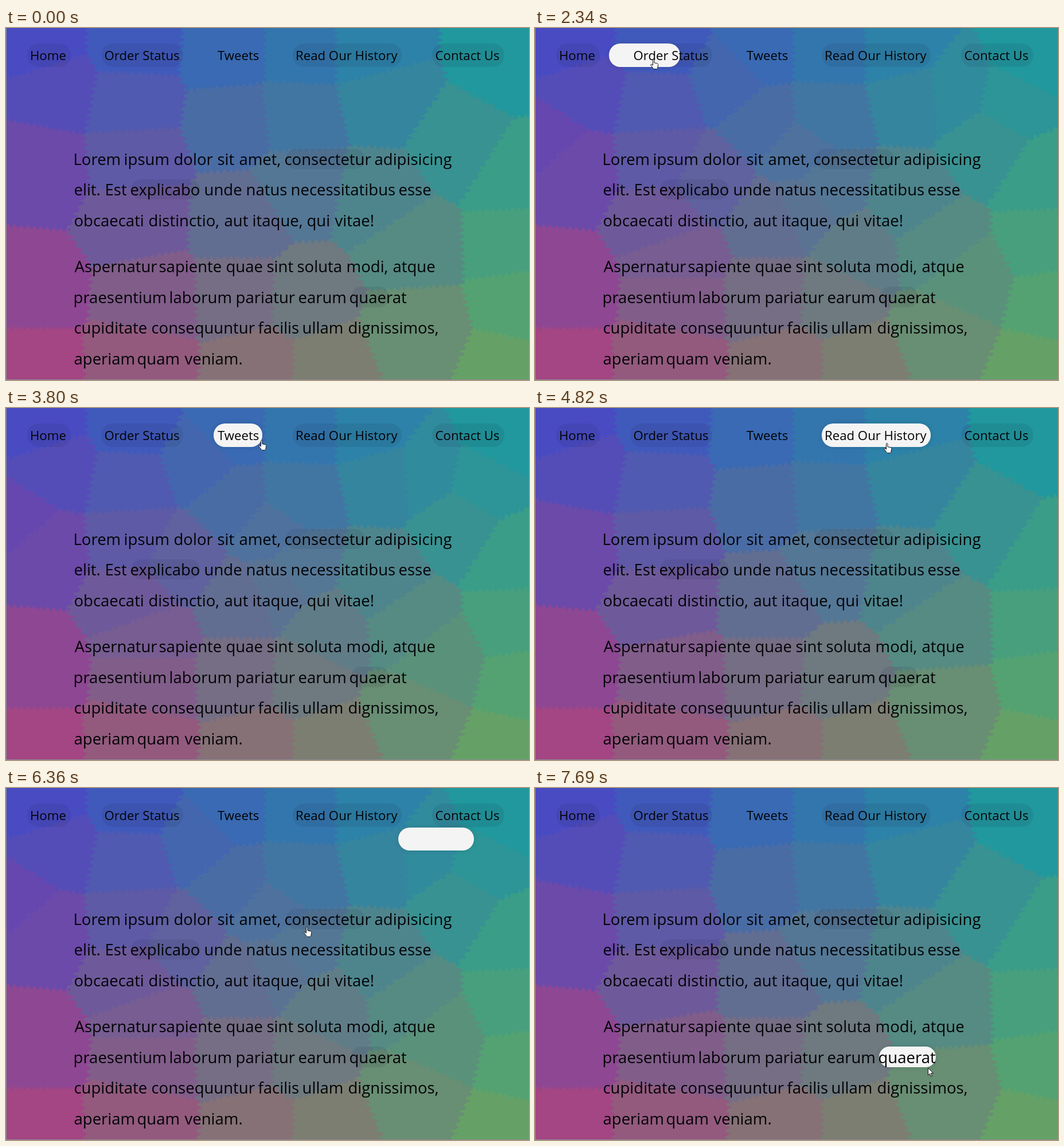
Recreate the animation shown at these times as an HTML page with a canvas. Size 912x614 px, loop 8000 ms.

```html
<!DOCTYPE html>
<html lang="en">
<head>
<meta charset="utf-8">
<title>Follow-along links</title>
<style>
  html, body { margin: 0; width: 100%; height: 100%; overflow: hidden; }
  #stage { position: relative; width: 912px; height: 614px; overflow: hidden; background: #5b7293; }
  canvas, #edge { position: absolute; inset: 0; width: 912px; height: 614px; image-rendering: pixelated; }
  #edge { box-sizing: border-box; border: solid #8a8d96; border-width: 0 0 1px 1px; }
  .ghost, #pill { position: absolute; border-radius: 20px; }
  .ghost { background: rgba(30, 30, 60, .09); }
  #pill { background: #f4f4f4; box-shadow: 0 0 8px rgba(0, 0, 0, .12); }
  svg { position: absolute; left: 0; top: 0; }
  text { font-family: "Open Sans", "Noto Sans", sans-serif; font-size: 27.5px; fill: #030306; }
  text.nav { font-size: 22.2px; }
  #cursor path { fill: #fff; stroke: #111; stroke-width: 1; stroke-linejoin: round; }
</style>
</head>
<body>
<div id="stage">
  <canvas id="calm"></canvas>
  <canvas id="busy"></canvas>
  <div id="edge"></div>
  <div id="ghosts"></div>
  <div id="pill"></div>
  <svg width="912" height="614">
    <g id="words"></g>
    <g id="cursor">
      <path id="arrow" d="M.5.5V13l3-2.7 2 4.9 2-.9-2-4.7h4z"/>
      <path id="hand" d="M4.5 1.7c0-1.6 2.4-1.6 2.4 0v5l4.8 1c1.6.4 2.3 1.2 2 2.8l-.8 4.6c-.2 1.2-.8 2.4-1.5 2.4H6.6c-1 0-1.6-1.4-2.4-2.6L1 11c-.8-1.4.8-2.2 2-1.2l1.5 1.3z"/>
    </g>
  </svg>
</div>
<script>
const LOOP = 8000, W = 912, H = 614;
const start = performance.now();
const $ = id => document.getElementById(id);

// Background: a four-corner blend, flattened into cells around these points
const corners = [[72, 70, 200], [24, 155, 160], [170, 65, 130], [100, 165, 100]];
const cells = [
  [60, 25], [220, 25], [390, 40], [510, 40], [640, 40], [870, 50],
  [85, 105], [215, 130], [400, 160], [505, 150], [660, 115], [790, 200], [885, 260],
  [60, 240], [220, 225], [225, 330], [410, 335], [510, 275], [650, 300], [700, 375],
  [40, 455], [250, 470], [410, 465], [520, 470], [710, 530], [905, 480], [890, 370],
  [40, 590], [230, 580], [440, 590], [560, 590], [880, 600]
];
const extraCells = [[25, 200], [340, 90], [300, 265], [460, 215], [470, 310],
  [560, 385], [730, 110], [830, 130], [250, 400], [750, 440]];

function blend([x, y]) {
  const u = x / W, v = y / H;
  const weights = [(1 - u) * (1 - v), u * (1 - v), (1 - u) * v, u * v];
  return [0, 1, 2].map(c => corners.reduce((sum, k, i) => sum + k[c] * weights[i], 0));
}

function paint(canvas, points) {
  const w = canvas.width = W / 2, h = canvas.height = H / 2;
  const ctx = canvas.getContext('2d');
  const img = ctx.createImageData(w, h);
  const colours = points.map(blend);
  for (let j = 0; j < h; j++) {
    for (let i = 0; i < w; i++) {
      // ragged cell borders
      const x = 2 * i + 4 * Math.sin(j * 1.1), y = 2 * j + 3 * Math.sin(i * 1.1);
      let best = 0, min = Infinity;
      for (let k = 0; k < points.length; k++) {
        const dx = x - points[k][0], dy = y - points[k][1], d = dx * dx + dy * dy;
        if (d < min) { min = d; best = k; }
      }
      img.data.set([...colours[best], 255], (j * w + i) * 4);
    }
  }
  ctx.putImageData(img, 0, 0);
}
paint($('calm'), cells);
paint($('busy'), cells.concat(extraCells));

// Text: baseline, words, left edge of each word
function addText(x, y, content, cls) {
  const el = document.createElementNS('http://www.w3.org/2000/svg', 'text');
  el.setAttribute('x', x);
  el.setAttribute('y', y);
  if (cls) el.setAttribute('class', cls);
  el.textContent = content;
  $('words').append(el);
}
[['Home', 42], ['Order Status', 171.5], ['Tweets', 369], ['Read Our History', 505], ['Contact Us', 748.5]]
  .forEach(([label, x]) => addText(x, 56, label, 'nav'));
[
  [239, 'Lorem ipsum dolor sit amet, consectetur adipisicing', [120, 208, 294, 370, 408, 487, 644]],
  [292, 'elit. Est explicabo unde natus necessitatibus esse', [120, 174, 218, 348, 421, 499, 686]],
  [346, 'obcaecati distinctio, aut itaque, qui vitae!', [120, 250, 382, 432, 526, 575]],
  [426, 'Aspernatur sapiente quae sint soluta modi, atque', [121, 268, 385, 456, 509, 596, 676]],
  [480, 'praesentium laborum pariatur earum quaerat', [120, 287, 403, 511, 600]],
  [533, 'cupiditate consequuntur facilis ullam dignissimos,', [120, 255, 441, 519, 598]],
  [587, 'aperiam quam veniam.', [120, 230, 313]]
].forEach(([y, line, xs]) =>
  line.split(' ').forEach((word, i) => addText(xs[i] - (/^[Lmnpriluh]/.test(word) ? 2.4 : 1.5), y, word)));

// Link boxes: left, top, width, height
const links = {
  home: [37, 27, 76, 41], order: [166, 27, 143, 41], tweets: [362, 27, 85, 41],
  read: [500, 27, 190, 41], contact: [743, 27, 126, 41],
  consectetur: [486, 211, 152, 36], quaerat: [600, 451, 99, 36]
};
const box = ([l, t, w, h]) =>
  ({ left: l + 'px', top: t + 'px', width: w + 'px', height: h + 'px' });

const { home, order, tweets, read, contact } = links;
[home, order, read, contact, [488, 211, 138, 35], [218, 264, 120, 35], [602, 451, 66, 36]].forEach(b => {
  const el = document.createElement('div');
  el.className = 'ghost';
  Object.assign(el.style, box(b));
  $('ghosts').append(el);
});

// The pill eases to each hovered link in 200 ms
const hovers = [['order', 2255], ['tweets', 2990], ['read', 3850], ['contact', 5030],
  ['consectetur', 6326], ['quaerat', 7440]];
const key = (name, ms) => ({ ...box(links[name]), offset: ms / LOOP, easing: 'ease' });
const path = [key('home', 0)];
let last = 'home';
for (const [name, ms] of hovers) {
  path.push(key(last, ms), key(name, ms + 200));
  last = name;
}
path.push(key(last, LOOP));
const pillMove = $('pill').animate(path, { duration: LOOP, fill: 'both' });
pillMove.pause();

const pointer = [
  [0, -50, 0], [1400, 57, 21, 1], [1560, 66, 40], [1685, 78, 48], [1810, 84, 50],
  [2210, 112, 53], [2340, 201, 54], [2465, 208, 54], [2590, 211, 53], [2850, 235, 53],
  [2990, 372, 55], [3130, 395, 55], [3280, 402, 55], [3800, 440, 56], [3930, 525, 58],
  [4070, 598, 60], [4820, 608, 61], [4945, 640, 60], [5070, 705, 56], [5195, 765, 49],
  [5320, 788, 44], [5720, 782, 49], [5840, 749, 69], [6070, 621, 162, 1], [6210, 562, 192, 1],
  [6360, 519, 242], [6500, 519, 242], [6640, 519, 242], [7140, 540, 262, 1], [7260, 604, 356, 1],
  [7380, 666, 454, 1], [7540, 674, 468], [7690, 685, 488, 1]
];
const busySpans = [[1560, 1810], [2210, 2590], [2990, 3280], [3800, 4820], [4945, 5320],
  [6360, 6640], [7540, 7690]];
const show = (el, on) => { el.style.visibility = on ? 'visible' : 'hidden'; };

function draw() {
  const now = (performance.now() - start) % LOOP;
  const [t, x, y, arrow] = pointer.findLast(p => p[0] <= now);
  pillMove.currentTime = t;
  show($('pill'), t >= 1560);
  show($('busy'), busySpans.some(([from, to]) => t >= from && t < to));
  show($('arrow'), arrow);
  show($('hand'), !arrow);
  $('cursor').setAttribute('transform', `translate(${x} ${y})`);
  requestAnimationFrame(draw);
}
draw();
</script>
</body>
</html>
```
